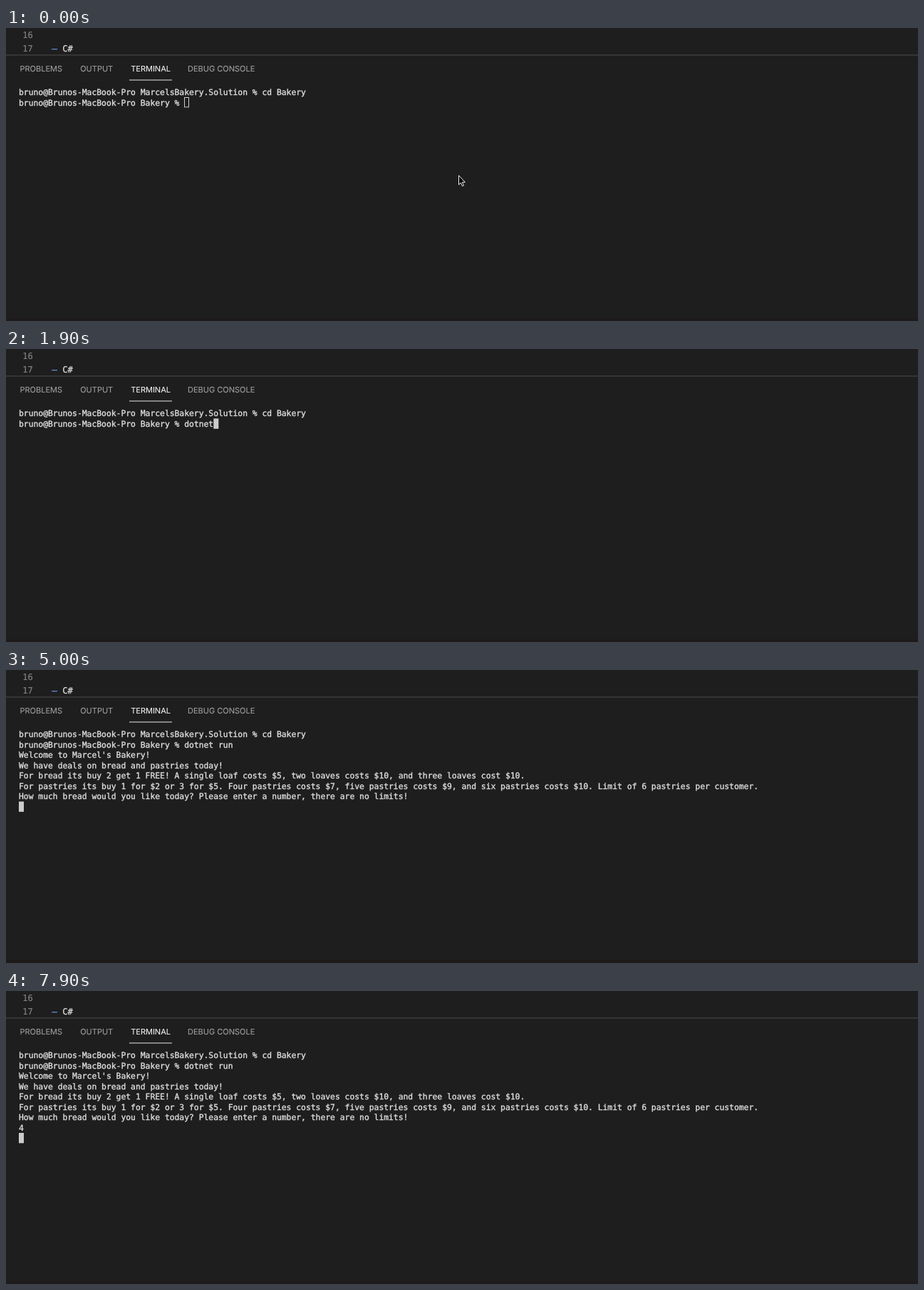
An HTML page for the animation above (8000 ms loop, 1280 by 411 pixels).

```html
<!DOCTYPE html>
<html lang="en">
<head>
<meta charset="utf-8">
<title>Terminal session</title>
<style>
  html, body { margin: 0; width: 100%; height: 100%; overflow: hidden; background: #1e1e1e; }
  svg { display: block; width: 100%; height: 100%; }
  text { white-space: pre; text-rendering: geometricPrecision; }
  .mono { font-family: "DejaVu Sans Mono", monospace; }
  .editor { font-size: 12.1px; fill: #858585; stroke: #858585; stroke-width: .15; }
  .editor .dash { fill: #6796e6; stroke: #6796e6; stroke-width: .4; }
  .editor .item { fill: #dcdcdc; stroke: #dcdcdc; stroke-width: .3; }
  .tab { font: 11px Inter, sans-serif; fill: #9c9c9c; stroke: #9c9c9c; stroke-width: .12; }
  .active { fill: #eeeeee; stroke: #eeeeee; }
  #term { font-size: 11.35px; fill: #dedede; stroke: #dedede; stroke-width: .35; }
</style>
</head>
<body>
<svg viewBox="0 0 1280 411">
  <rect width="1280" height="411" fill="#1e1e1e"/>
  <rect y="407" width="1280" height="4" fill="#1e1a1b"/>

  <g class="mono editor">
    <text x="23.2" y="14.3">16</text>
    <text x="23.2" y="33.3">17</text>
    <text class="dash" x="64.6" y="33.3">–</text>
    <text class="item" x="79.2" y="33.3">C#</text>
  </g>

  <rect y="37.5" width="1280" height="1" fill="#4c4c4c"/>
  <text class="tab" x="19.5" y="60.7">PROBLEMS</text>
  <text class="tab" x="104.2" y="60.7">OUTPUT</text>
  <text class="tab active" x="175.2" y="60.7">TERMINAL</text>
  <text class="tab" x="255" y="60.7">DEBUG CONSOLE</text>
  <rect x="173" y="72.5" width="60" height="1" fill="#e7e7e7"/>

  <g id="term" class="mono"></g>
  <rect id="block" width="7" height="14.4" fill="#cccccc"/>
  <rect id="hollow" width="6" height="13.4" fill="none" stroke="#cccccc"/>

  <path id="arrow" d="M0 0V13L2.9 10.3L4.9 15L6.9 14.1L4.9 9.5H8.8Z"
        fill="#000" stroke="#f2f2f2" stroke-linejoin="round"/>
  <path id="beam" d="M-3 -7Q0 -7 0 -5V5.5Q0 7.5 -3 7.5M3 -7Q0 -7 0 -5M0 5.5Q0 7.5 3 7.5M-1.5 2.5H1.5"
        fill="none" stroke="#d8d8d8"/>
</svg>
<script>
  const LOOP = 8000;
  const LEFT = 18, TOP = 83, CELL = 6.833, ROW = 14.5, BASE = 11.2;
  const HOST = "bruno@Brunos-MacBook-Pro";
  const PROMPT = HOST + " Bakery % ";
  const COMMAND = "dotnet run";
  const KEY_TIMES = [600, 1200, 1400, 1600, 1700, 1900, 2100, 2300, 2400, 2600];
  const ENTER = 3300, OUTPUT = 5000, ANSWER = 7100, CONFIRM = 7900;
  const MOVE = 100, FOCUS = 200, BEAM = 300, HIDE = 700;
  const GREETING = [
    "Welcome to Marcel's Bakery!",
    "We have deals on bread and pastries today!",
    "For bread its buy 2 get 1 FREE! A single loaf costs $5, two loaves costs $10, and three loaves cost $10.",
    "For pastries its buy 1 for $2 or 3 for $5. Four pastries costs $7, five pastries costs $9, and six pastries costs $10. Limit of 6 pastries per customer.",
    "How much bread would you like today? Please enter a number, there are no limits!"
  ];

  const $ = id => document.getElementById(id);
  const rows = Array.from({ length: 9 }, (_, i) => {
    const row = document.createElementNS("http://www.w3.org/2000/svg", "text");
    row.setAttribute("x", LEFT);
    row.setAttribute("y", TOP + ROW * i + BASE);
    return $("term").appendChild(row);
  });

  function screenAt(t) {
    const typed = KEY_TIMES.filter(k => k <= t).length;
    const lines = [HOST + " MarcelsBakery.Solution % cd Bakery", PROMPT + COMMAND.slice(0, typed)];
    if (t >= OUTPUT) lines.push(...GREETING, t >= ANSWER ? "4" : "");
    else if (t >= ENTER) lines.push("");
    if (t >= CONFIRM) lines.push("");
    return lines;
  }

  function place(el, shown, x, y) {
    el.setAttribute("visibility", shown ? "visible" : "hidden");
    el.setAttribute("transform", `translate(${x} ${y})`);
  }

  function draw(t) {
    const lines = screenAt(t);
    rows.forEach((row, i) => {
      const line = lines[i] || "";
      if (row.textContent !== line) row.textContent = line;
    });

    const last = lines.length - 1;
    const x = LEFT + CELL * lines[last].length;
    const y = TOP + ROW * last;
    place($("block"), t >= FOCUS, x, y);
    place($("hollow"), t < FOCUS, Math.round(x) + .5, y);

    const moved = t >= MOVE;
    place($("arrow"), t < BEAM, moved ? 640.5 : 635.5, moved ? 207.5 : 206.8);
    place($("beam"), t >= BEAM && t < HIDE, 636.5, 208);
  }

  const start = performance.now();
  function tick() {
    draw((performance.now() - start) % LOOP);
    requestAnimationFrame(tick);
  }
  tick();
</script>
</body>
</html>
```
